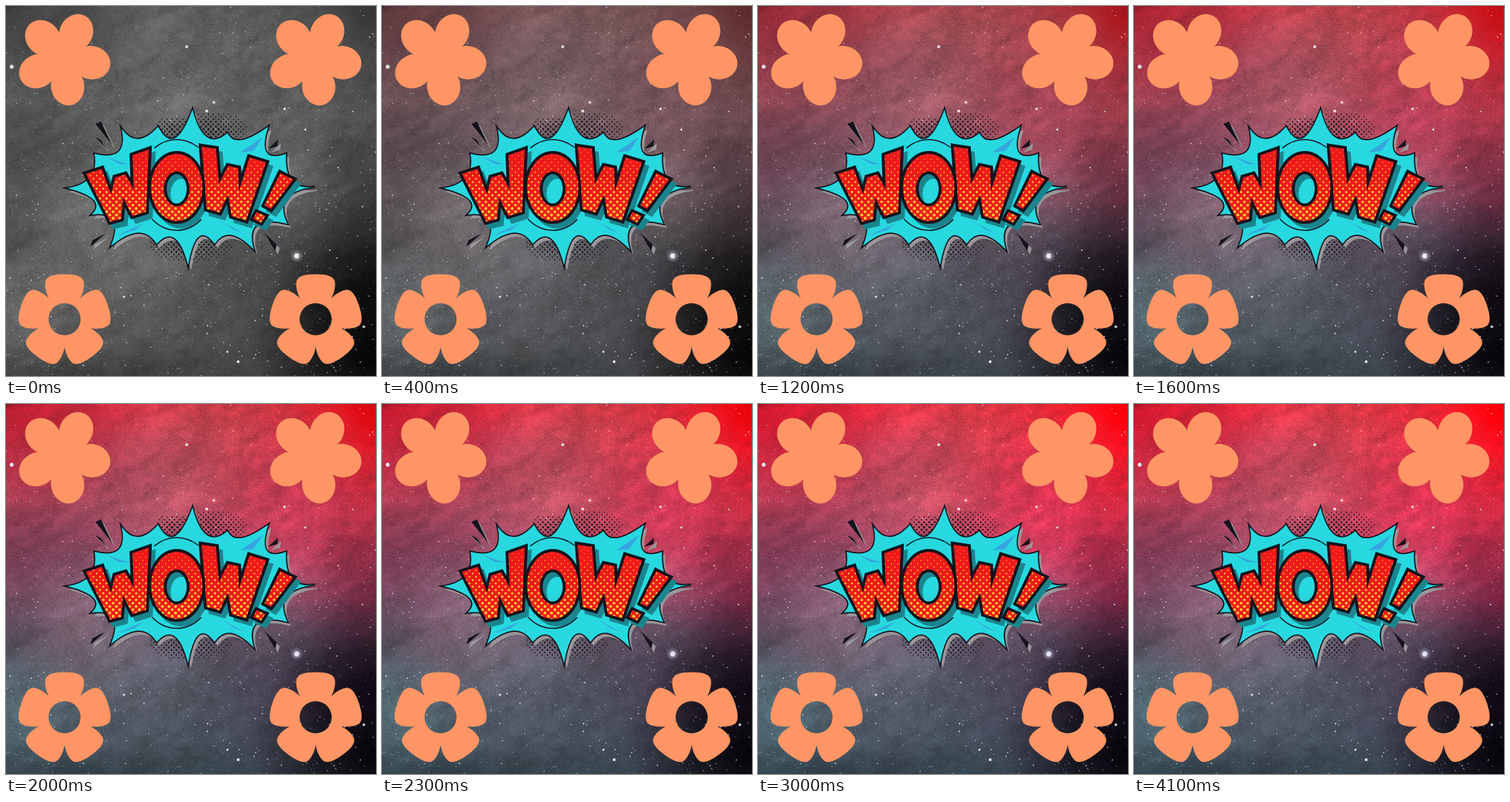
Animation, 518 px wide and 518 px high, one loop 4500 ms. Source, as an HTML page with a canvas:

```html
<!DOCTYPE html>
<html lang="en">
<head>
<meta charset="utf-8">
<title>Wow</title>
<style>
  html, body { margin: 0; width: 100%; height: 100%; overflow: hidden; background: #000; }
  canvas { position: absolute; left: 0; top: 0; }
</style>
</head>
<body>
<canvas id="sky" width="518" height="518"></canvas>
<canvas id="art" width="518" height="518" role="img" aria-label="WOW!"></canvas>
<script>
const SIZE = 518, LOOP = 4500, STEP = 100, FADE = 3100;
const sky = document.getElementById('sky');
const bg = sky.getContext('2d', { willReadFrequently: true });
const fg = document.getElementById('art').getContext('2d');

let seed = 7;
const random = () => (seed = (seed * 16807) % 2147483647) / 2147483647;

// ---------- nebula ----------
function glow(x, y, radius, color) {
  const g = bg.createRadialGradient(x, y, 0, x, y, radius);
  g.addColorStop(0, color);
  g.addColorStop(1, color.slice(0, 7) + '00');
  bg.fillStyle = g;
  bg.fillRect(0, 0, SIZE, SIZE);
}

function hash(x, y) {
  let h = Math.imul(x, 374761393) + Math.imul(y, 668265263);
  h = Math.imul(h ^ (h >>> 13), 1274126177);
  return ((h ^ (h >>> 16)) >>> 0) / 4294967296;
}

function smoothNoise(x, y) {
  const i = Math.floor(x), j = Math.floor(y);
  const ease = v => v * v * (3 - 2 * v);
  const u = ease(x - i), v = ease(y - j);
  const top = hash(i, j) * (1 - u) + hash(i + 1, j) * u;
  const low = hash(i, j + 1) * (1 - u) + hash(i + 1, j + 1) * u;
  return top * (1 - v) + low * v - 0.5;
}

function addTexture() {
  const image = bg.getImageData(0, 0, SIZE, SIZE), d = image.data;
  for (let y = 0, k = 0; y < SIZE; y++) {
    for (let x = 0; x < SIZE; x++, k += 4) {
      const along = x * 0.9 - y * 0.42, across = x * 0.42 + y * 0.9;
      const light = 1 + smoothNoise(along / 85, across / 38) * 0.18
        + smoothNoise(along / 26, across / 11) * 0.16
        + smoothNoise(x / 7, y / 7) * 0.1
        + (hash(x, y + 900) - 0.5) * 0.22;
      for (let c = 0; c < 3; c++) d[k + c] *= light;
    }
  }
  bg.putImageData(image, 0, 0);
}

function star(x, y, r, alpha) {
  bg.fillStyle = `rgba(240,236,246,${alpha})`;
  bg.beginPath();
  bg.arc(x, y, r, 0, 7);
  bg.fill();
}

function drawSky() {
  const base = bg.createLinearGradient(0, 0, 0, SIZE);
  ['#dc2a3c', '#cc3c56', '#bc4860', '#a44a68', '#875570', '#6a5a6c', '#565f6c', '#44525e', '#33424c']
    .forEach((color, i, all) => base.addColorStop(i / (all.length - 1), color));
  bg.fillStyle = base;
  bg.fillRect(0, 0, SIZE, SIZE);
  glow(0, 0, 190, '#cc1026c0');
  glow(510, 10, 250, '#f80008ff');
  glow(320, 55, 180, '#f04e58c0');
  glow(400, 155, 170, '#e8385ed0');
  glow(225, 120, 120, '#c8586c90');
  glow(0, 235, 150, '#6a284270');
  glow(518, 270, 120, '#800c2cb0');
  glow(110, 310, 120, '#8c6a7ca0');
  glow(0, 345, 90, '#40404c90');
  glow(20, 430, 100, '#587880a0');
  glow(200, 410, 140, '#60606e90');
  glow(400, 400, 160, '#40284090');
  glow(518, 400, 150, '#140516e8');
  glow(518, 490, 180, '#06030aff');
  addTexture();
  for (let i = 0; i < 1500; i++) {
    const y = SIZE * Math.pow(random(), 0.7);
    star(random() * SIZE, y, 0.35 + random() * random() * 0.85, 0.4 + random() * 0.5);
  }
  glow(407, 350, 9, '#c8d0ffc0');
  [[8, 85, 2.8], [407, 350, 3.4], [253, 57, 2], [281, 147, 2], [291, 135, 1.8], [390, 144, 1.8],
   [501, 449, 1.8], [325, 498, 2], [345, 322, 1.8], [165, 407, 1.6], [419, 173, 1.4], [310, 484, 1.5]]
    .forEach(([x, y, r]) => star(x, y, r, 0.95));
}

// ---------- flowers ----------
const PEACH = '#ff9564';

function petals(x, y, startDegrees, drawPetal) {
  fg.fillStyle = PEACH;
  for (let i = 0; i < 5; i++) {
    fg.save();
    fg.translate(x, y);
    fg.rotate((startDegrees + i * 72) * Math.PI / 180);
    drawPetal();
    fg.restore();
  }
}

function disc(x, y, r) {
  fg.beginPath();
  fg.arc(x, y, r, 0, 7);
  fg.fill();
}

function roundFlower(x, y) {
  petals(x, y, 9, () => {
    fg.beginPath();
    fg.ellipse(40, 0, 26.7, 23.3, 0, 0, 7);
    fg.fill();
  });
  disc(x, y, 31);
}

const flaredPetal = new Path2D(
  'M0 0L-21 -28C-25 -36 -28 -44 -27 -53C-26 -61 -16 -64 0 -64C16 -64 26 -61 27 -53C28 -44 25 -36 21 -28Z');

function ringFlower(x, y) {
  petals(x, y, 0, () => fg.fill(flaredPetal));
  fg.globalCompositeOperation = 'destination-out';
  disc(x, y - 1, 22.5);
  fg.globalCompositeOperation = 'source-over';
}

// ---------- comic burst ----------
const INK = '#15131c', CYAN = '#28d8df', TEAL = '#1b858e', RED = '#ee1a1a', YELLOW = '#ffc832';

const burst = new Path2D(`M261 145Q277 206 310 178Q321 202 367 169Q350 222 392 207Q389 260 432 253
  Q372 261 394 305Q332 290 347 341Q311 304 292 333Q266 298 255 363Q239 302 211 333Q190 300 147 336
  Q167 286 120 292Q143 270 86 255Q131 248 124 207Q172 219 162 172Q183 202 213 169Q236 213 261 145Z`);

const shards = new Path2D(`M125 165L133 162L149 195ZM125 184L132 187L141 200ZM118 337L121 328L139 319Z
  M367 200L381 187L380 196ZM362 318L379 334L377 343Z`);

const streaks = new Path2D(`M142 212L172 222L158 221ZM328 205L360 183L346 203ZM155 321L192 305L180 314Z
  M306 304L333 319L318 313Z`);

const letters = [
  'M112 235L134 228L147 264L153 240L167 236L179 257L177 209L200 201L196 288L177 294L164 268L161 298L146 302Z',
  'M274 197L294 200L298 249L311 224L325 227L326 259L341 212L364 219L336 300L316 294L311 264L299 289L281 284Z',
  'M384 234L402 243L371 284L362 279ZM351 289L363 294L357 303L346 298Z',
  'M203 254A36 47 0 1 1 275 254A36 47 0 1 1 203 254ZM221 256A18 24.5 0 1 0 257 256A18 24.5 0 1 0 221 256Z'
].map(d => new Path2D(d));

function paint(path, fill, stroke, width) {
  fg.strokeStyle = stroke;
  fg.lineWidth = width;
  if (width) fg.stroke(path);
  fg.fillStyle = fill;
  fg.fill(path, 'evenodd');
}

function shifted(dx, dy, draw) {
  fg.save();
  fg.translate(dx, dy);
  draw();
  fg.restore();
}

function halftone(x, y, rx, ry) {
  fg.fillStyle = INK;
  for (let row = -ry, odd = 0; row <= ry; row += 3.5, odd ^= 1) {
    for (let col = -rx + odd * 3.5; col <= rx; col += 7) {
      const reach = Math.hypot(col / rx, row / ry);
      if (reach < 1) disc(x + col, y + row, 1.6 - reach * 0.8);
    }
  }
}

function letterDots(path) {
  fg.save();
  fg.clip(path, 'evenodd');
  fg.fillStyle = YELLOW;
  for (let row = 0; row < 26; row++) {
    const y = 196 + row * 4.6;
    for (let x = 104 + row % 2 * 4.6; x < 410; x += 9.2) {
      disc(x, y, Math.max(0.6, Math.min(2.1, 0.6 + (y - 210) * 0.019)));
    }
  }
  fg.restore();
}

function arcAroundO(radius, from, to) {
  fg.strokeStyle = INK;
  fg.lineWidth = 1.6;
  fg.beginPath();
  fg.ellipse(239, 252, radius * 0.84, radius, 0, from, to);
  fg.stroke();
}

function drawBurst() {
  halftone(288, 173, 50, 25);
  halftone(232, 172, 24, 17);
  halftone(258, 336, 58, 23);
  fg.lineJoin = 'miter';
  shifted(4, 5, () => {
    paint(shards, '#9b989b');
    paint(burst, '#9b989b', '#9b989b', 1);
  });
  paint(shards, INK);
  paint(burst, CYAN, INK, 3.5);
  paint(streaks, '#35a5df');
  arcAroundO(65, 4.1, 5.3);
  arcAroundO(62, 0.85, 2.3);
  shifted(6, 7, () => letters.forEach(path => paint(path, TEAL, TEAL, 7)));
  for (const path of letters) {
    paint(path, RED, INK, 8);
    letterDots(path);
  }
}

drawSky();
for (const x of [80, 431.5]) {
  roundFlower(x, 73);
  ringFlower(x + 2, 439.5);
}
drawBurst();

function frame(now) {
  const time = Math.floor(now % LOOP / STEP) * STEP;
  const color = Math.sin(Math.PI / 2 * Math.min(1, time / FADE));
  sky.style.filter = `grayscale(${1 - color})`;
  requestAnimationFrame(frame);
}
frame(performance.now());
</script>
</body>
</html>
```
